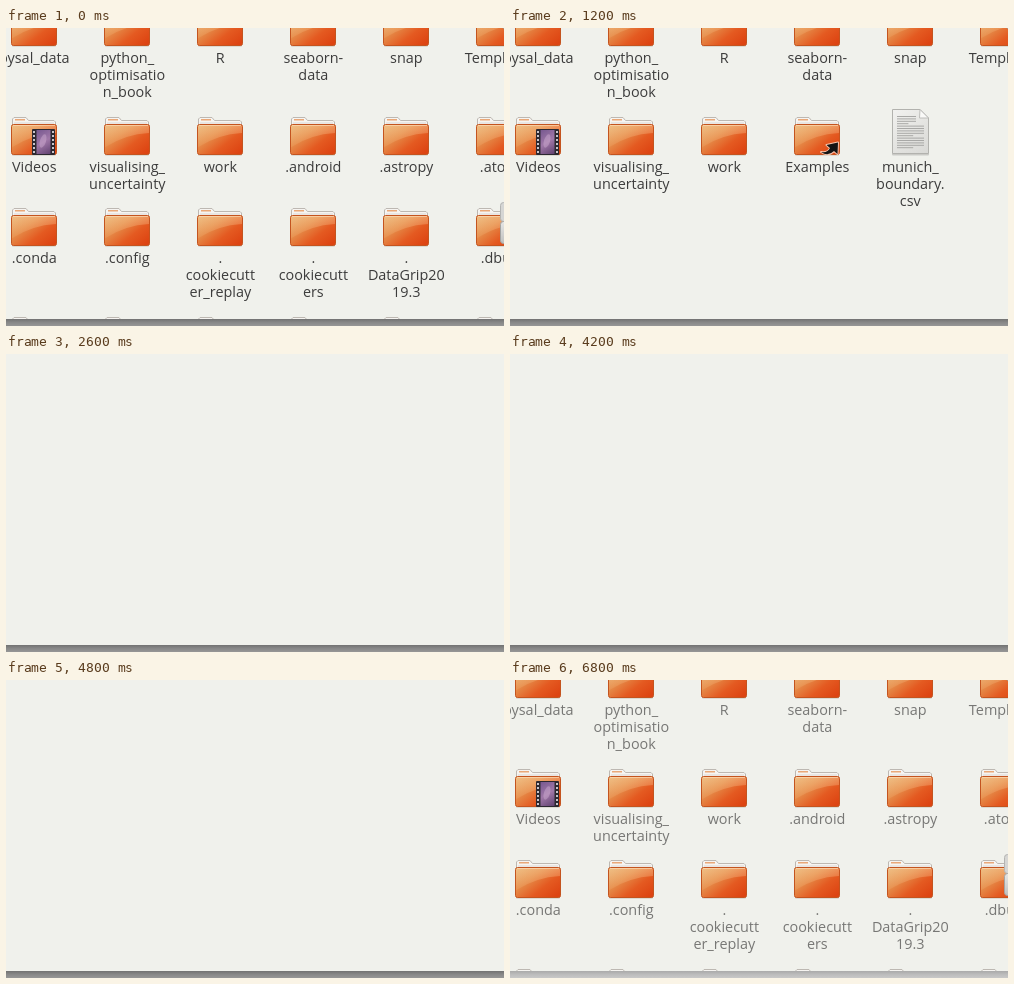
Write an HTML page with a canvas that moves like this. It is 498 px wide and 298 px high and loops after 6.9 s.

```html
<!DOCTYPE html>
<html lang="en">
<head>
<meta charset="utf-8">
<title>Hidden files toggle</title>
<style>
html, body { margin: 0; width: 100%; height: 100%; overflow: hidden; background: #f0f1ec; }
canvas { display: block; }
</style>
</head>
<body>
<canvas id="view" width="498" height="298"></canvas>
<script>
const ctx = document.getElementById('view').getContext('2d');
const W = 498, H = 298, LOOP = 6900;
const COL0 = 28, COL_STEP = 93, LINE = 17;
const ROWS = [-20, 89, 180, 289];

const topRow = [['pysal_data'], ['python_', 'optimisatio', 'n_book'], ['R'], ['seaborn-', 'data'], ['snap'], ['Templates']];
const home = [['Videos'], ['visualising_', 'uncertainty'], ['work']];
const allFiles = [
  topRow,
  [...home, ['.android'], ['.astropy'], ['.atom']],
  [['.conda'], ['.config'], ['.', 'cookiecutt', 'er_replay'], ['.', 'cookiecutt', 'ers'], ['.', 'DataGrip20', '19.3'], ['.dbus']],
  [[], [], [], [], [], []]
];
const plainFiles = [topRow, [...home, ['Examples'], ['munich_', 'boundary.', 'csv']]];

// start time, listing, window in background
const steps = [
  [0, allFiles], [900, []], [1200, plainFiles], [2600, []], [2800, allFiles], [4200, []],
  [4400, plainFiles], [4800, []], [5000, allFiles], [6800, allFiles, true]
];

function gradient(x0, y0, x1, y1, ...colors) {
  const g = ctx.createLinearGradient(x0, y0, x1, y1);
  colors.forEach((c, i) => g.addColorStop(i / (colors.length - 1), c));
  return g;
}

function box(x, y, w, h, r, fill, line) {
  ctx.beginPath();
  ctx.roundRect(x, y, w, h, r);
  if (fill) { ctx.fillStyle = fill; ctx.fill(); }
  if (line) { ctx.strokeStyle = line; ctx.stroke(); }
}

function shape(points, fill, line) {
  ctx.beginPath();
  points.forEach(([x, y]) => ctx.lineTo(x, y));
  ctx.closePath();
  if (fill) { ctx.fillStyle = fill; ctx.fill(); }
  if (line) { ctx.strokeStyle = line; ctx.stroke(); }
}

function folder() {
  box(1, 36, 44, 2.5, 1, 'rgba(80,50,30,.25)');
  shape([[1.5, 30], [1.5, 2], [3, .5], [15, .5], [17.5, 3.5], [43, 3.5], [44.5, 5], [44.5, 30]], '#f6f4f1', '#bdb8b2');
  ctx.fillStyle = '#e9a878';
  ctx.fillRect(4, 2, 10, 1.5);
  ctx.fillStyle = '#dedad5';
  ctx.fillRect(3, 5.5, 40, 1);
  box(.5, 7.5, 45, 30, 2, gradient(6, 7, 34, 42, '#e6a768', '#e58a48', '#e45a21', '#dd4412'), '#c4541f');

  ctx.save();
  ctx.beginPath();
  ctx.roundRect(1, 8, 44, 29, 2);
  ctx.clip();
  ctx.beginPath();
  ctx.moveTo(0, 7);
  ctx.lineTo(46, 7);
  ctx.lineTo(46, 16);
  ctx.quadraticCurveTo(21, 17, 0, 31);
  ctx.closePath();
  ctx.fillStyle = gradient(0, 8, 0, 30, 'rgba(255,225,175,.36)', 'rgba(255,215,160,.1)');
  ctx.fill();
  ctx.restore();
  ctx.fillStyle = 'rgba(255,226,190,.6)';
  ctx.fillRect(2, 8, 42, 1);
}

function film() {
  box(21, 12, 23, 26, 1, '#2b2830');
  ctx.fillStyle = gradient(25, 13, 40, 37, '#76578f', '#a078a8', '#60406f');
  ctx.fillRect(25.5, 13, 14, 24);
  ctx.fillStyle = 'rgba(225,195,225,.35)';
  ctx.beginPath();
  ctx.ellipse(32, 24, 3, 7, .3, 0, 7);
  ctx.fill();
  ctx.fillStyle = '#c9c5cc';
  for (let y = 14; y < 37; y += 4) {
    ctx.fillRect(22, y, 2, 2);
    ctx.fillRect(41, y, 2, 2);
  }
}

function linkArrow() {
  ctx.lineJoin = 'round';
  ctx.beginPath();
  ctx.moveTo(27, 35);
  ctx.quadraticCurveTo(34, 36, 36, 31);
  ctx.lineTo(32.5, 28);
  ctx.lineTo(44, 25.5);
  ctx.lineTo(43.5, 37);
  ctx.lineTo(40, 34);
  ctx.quadraticCurveTo(34, 40, 27, 35);
  ctx.closePath();
  ctx.lineWidth = 2;
  ctx.strokeStyle = 'rgba(255,235,220,.75)';
  ctx.stroke();
  ctx.fillStyle = '#141414';
  ctx.fill();
  ctx.lineWidth = 1;
}

function ruler() {
  shape([[21, 14], [44, 14], [44, 37.5], [21.5, 14]], '#f4f4f2', '#8e8e8c');
  shape([[30, 18], [40, 18], [40, 28]], '#dcdcd9', '#aaaaa8');
}

function lock() {
  box(24.5, -5.5, 30, 19, 3, '#d6d6d4', '#b4b4b2');
  box(24.5, 13.5, 30, 22, 3, gradient(0, 14, 0, 36, '#e6e6e4', '#c0c0be'), '#a5a5a3');
}

function sheet() {
  box(5, 36, 37, 2.5, 1, 'rgba(0,0,0,.16)');
  shape([[5.5, -7.5], [33, -7.5], [41.5, 1], [41.5, 36.5], [5.5, 36.5]], gradient(5, -8, 40, 37, '#f2f2f0', '#e5e5e2', '#d9d9d6'), '#b2b2ae');
  shape([[33, -7.5], [32.5, 1], [41.5, 1]], '#fafaf8', '#bdbdba');
  ctx.fillStyle = '#a8a8a6';
  for (let i = 0; i < 14; i++) {
    const short = i % 5 === 3;
    const end = i < 4 ? 19 : 27;
    ctx.fillRect(10, -1 + i * 2.4, short ? end * .6 : end, 1);
  }
}

const emblems = { Videos: film, Examples: linkArrow, Templates: ruler, '.dbus': lock };

function item(lines, col, row, color) {
  const cx = COL0 + col * COL_STEP, top = ROWS[row];
  ctx.save();
  ctx.translate(cx - 23, top);
  if (lines[0] === 'munich_') sheet();
  else folder();
  if (emblems[lines[0]]) emblems[lines[0]]();
  ctx.restore();
  ctx.fillStyle = color;
  lines.forEach((s, i) => ctx.fillText(s, cx + .3, top + 55 + i * LINE));
}

function draw(t) {
  const [, rows, faded] = steps.findLast(s => s[0] <= t);
  ctx.fillStyle = '#f0f1ec';
  ctx.fillRect(0, 0, W, H);
  ctx.font = '14.4px "Open Sans", "Noto Sans", sans-serif';
  ctx.textAlign = 'center';
  rows.forEach((row, r) => row.forEach((lines, c) => item(lines, c, r, faded ? '#777775' : '#3c3c3c')));
  ctx.fillStyle = faded
    ? gradient(0, 291, 0, H, '#aaaaaa', '#bcbcbc', '#c8c8c8')
    : gradient(0, 291, 0, H, '#727272', '#888888', '#969696');
  ctx.fillRect(0, 291, W, 7);
}

const start = performance.now();
function tick() {
  draw((performance.now() - start) % LOOP);
  requestAnimationFrame(tick);
}
tick();
</script>
</body>
</html>
```
